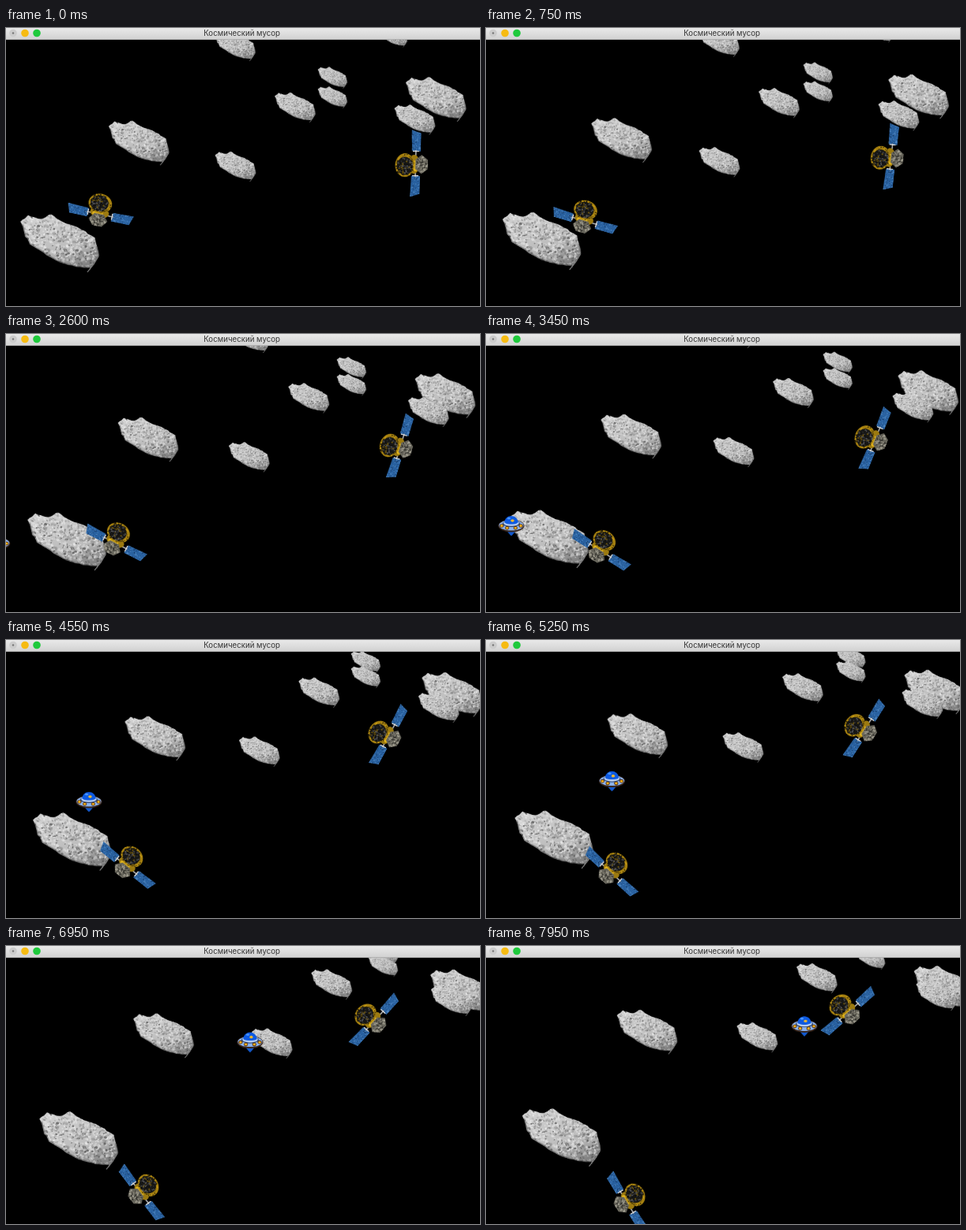
These frames come from a looping animation (600 px wide and 353 px high, 8000 ms). An HTML page with a canvas:

```html
<!DOCTYPE html>
<html lang="ru">
<head>
<meta charset="utf-8">
<title>Космический мусор</title>
<style>
  html, body { margin: 0; width: 100%; height: 100%; overflow: hidden; background: #000; }
  canvas { display: block; }
</style>
</head>
<body>
<canvas id="stage" width="600" height="353"></canvas>
<script>
const LOOP = 8000, STEP = 50, DETAIL = 3, TURN = Math.PI * 2;
const ctx = document.getElementById('stage').getContext('2d');
ctx.imageSmoothingQuality = 'high';

let seed = 11;
const rnd = () => (seed = (seed * 16807) % 2147483647) / 2147483647;
const between = (a, b) => a + (b - a) * rnd();

// Paints once at high detail, with the origin in the middle of the sprite.
function sprite(w, h, paint) {
  const image = document.createElement('canvas');
  image.width = w * DETAIL;
  image.height = h * DETAIL;
  const g = image.getContext('2d');
  g.scale(DETAIL, DETAIL);
  g.translate(w / 2, h / 2);
  paint(g);
  return { image, w, h };
}

function stamp({ image, w, h }, x, y, scale = 1, angle = 0) {
  ctx.save();
  ctx.translate(x, y);
  ctx.rotate(angle);
  ctx.scale(scale, scale);
  ctx.drawImage(image, -w / 2, -h / 2, w, h);
  ctx.restore();
}

function trace(g, pts) {
  g.beginPath();
  pts.forEach(([x, y]) => g.lineTo(x, y));
}

function poly(g, pts, fill) {
  trace(g, pts);
  g.closePath();
  g.fillStyle = fill;
  g.fill();
}

function line(g, pts, color, width) {
  trace(g, pts);
  g.strokeStyle = color;
  g.lineWidth = width;
  g.stroke();
}

function oval(g, x, y, rx, ry, fill, turn = 0) {
  g.beginPath();
  g.ellipse(x, y, rx, ry, turn, 0, TURN);
  g.fillStyle = fill;
  g.fill();
}

// Scatters specks over an ellipse, cycling through the colours.
function speckle(g, count, x, y, rx, ry, size, colors) {
  for (let i = 0; i < count; i++) {
    const a = rnd() * TURN, r = Math.sqrt(rnd());
    oval(g, x + rx * r * Math.cos(a), y + ry * r * Math.sin(a),
      size * between(.5, 1.2), size * between(.4, .9), colors[i % colors.length], a);
  }
}

// Breaks every edge into short rough pieces.
function roughen(pts, pieces, rough) {
  return pts.flatMap(([x, y], i) => {
    const [nx, ny] = pts[(i + 1) % pts.length];
    return Array.from({ length: pieces }, (_, k) => [
      x + (nx - x) * k / pieces + between(-rough, rough),
      y + (ny - y) * k / pieces + between(-rough, rough)
    ]);
  });
}

const rock = sprite(104, 80, g => {
  g.translate(-50, -37);
  const outline = roughen([
    [0, 9], [9, 1], [26, 6], [38, -1], [50, 8], [77, 19], [93, 29], [99, 52],
    [89, 67], [70, 67], [48, 60], [28, 48], [11, 38], [4, 24]
  ], 4, .7);
  const light = g.createLinearGradient(42, 0, 62, 72);
  light.addColorStop(0, '#cfcfcf');
  light.addColorStop(.6, '#bdbdbd');
  light.addColorStop(1, '#7c7c7c');
  g.save();
  poly(g, outline, light);
  g.clip();
  speckle(g, 420, 50, 34, 56, 42, 2.3, ['rgba(250,250,250,.3)', 'rgba(60,60,60,.22)']);
  speckle(g, 500, 50, 34, 56, 42, 1.1, ['rgba(255,255,255,.5)', 'rgba(40,40,40,.45)']);
  for (let i = 0; i < 26; i++) {
    const x = between(6, 94), y = between(5, 65), r = between(1, 2.6);
    oval(g, x + .9, y + .9, r, r * .8, 'rgba(250,250,250,.6)');
    oval(g, x, y, r * .8, r * .65, 'rgba(70,70,70,.7)');
  }
  line(g, outline.slice(26), 'rgba(40,40,40,.4)', 3);
  g.restore();
  for (const reach of [0, 3]) {
    line(g, [[98 - reach, 53], [92 - reach, 63], [84 + reach, 73 - reach]], '#828282', 1.2);
  }
});

const satellite = sprite(90, 60, g => {
  for (const side of [-1, 1]) {
    g.save();
    poly(g, [[16, -5], [42.5, -6], [38.5, 6], [15.5, 6]].map(([x, y]) => [side * x, y]), '#28609f');
    g.clip();
    speckle(g, 170, side * 29, 0, 18, 9, .8, ['#5189c4', '#173b68', '#3a74b2']);
    g.restore();
    line(g, [[0, 0], [side * 17, 0]], '#a8a8a8', 1.6);
    line(g, [[side * 15.5, -4], [side * 15.5, 4]], '#e4e4e4', 1.2);
  }

  oval(g, -1, -2, 12, 7, '#9c7a10');
  oval(g, -3, 0, 7, 4, '#e0b31c');
  const hexagon = Array.from({ length: 6 }, (_, i) =>
    [-1 + 12 * Math.cos(i * TURN / 6), 7.5 + 9 * Math.sin(i * TURN / 6)]);
  poly(g, hexagon, '#67655b');
  speckle(g, 90, -1, 8, 10, 7, 1.1, ['#33322d', '#a9a698', '#807d70']);

  oval(g, -2.5, -13.5, 15, 12.3, '#a5800f');
  speckle(g, 130, -2.5, -13.5, 14.5, 12, 1, ['#c99d17', '#4a390a', '#211a08']);
  oval(g, -3.5, -13.5, 11.5, 10, '#171715');
  speckle(g, 70, -3.5, -13.5, 11, 9.5, 1.2, ['#3d3e42', '#0b0b0b', '#57585c', '#6f570d']);
});

const saucer = sprite(40, 36, g => {
  poly(g, [[-7, 5], [7, 5], [2, 11], [0, 13], [-2, 11]], '#1258cc');
  oval(g, 0, 0, 16.5, 8, '#38251a');
  oval(g, 0, -.6, 15.6, 6.6, '#8db3ec');
  oval(g, 0, -2.8, 11, 4.2, '#2a3f66');
  oval(g, 0, -3.4, 9.8, 3.8, '#b5ccf2');
  g.beginPath();
  g.ellipse(0, -4.5, 8.5, 8, 0, Math.PI, TURN);
  g.ellipse(0, -4.5, 8.5, 2.5, 0, 0, Math.PI);
  g.fillStyle = '#0d5ae2';
  g.fill();
  oval(g, -3, -9.5, 2.2, 1.3, '#4997ff');
  oval(g, 1.5, -6.5, 2.2, 1.7, '#efb92b');
  for (let i = 0; i < 4; i++) {
    const a = Math.PI * (.08 + .28 * i), x = 12.5 * Math.cos(a), y = 4.2 * Math.sin(a) - 1;
    oval(g, x, y, 2.6, 2.3, '#4e2b10');
    oval(g, x, y, 1.7, 1.5, '#f8b41c');
  }
});

// Smaller rocks drift faster; climb is the slope of the drift. Back to front.
const SIZES = { huge: 100, big: 77, mid: 52, small: 37.5 };
const rocks = [
  { x: 19, y: 237, size: 'huge', climb: 1.1 },
  { x: 130.5, y: 118, size: 'big', climb: 1.03 },
  { x: 265, y: 157, size: 'mid', climb: 1.13 },
  { x: 340.5, y: 82, size: 'mid', climb: 1.13 },
  { x: 264.5, y: 4, size: 'mid', climb: 1.05 },
  { x: 471, y: -3, size: 'small', climb: .87 },
  { x: 395, y: 49.5, size: 'small', climb: .84 },
  { x: 395, y: 74.5, size: 'small', climb: .98 },
  { x: 506.5, y: 62.5, size: 'big', climb: 1.04 },
  { x: 492, y: 97.5, size: 'mid', climb: 1.01 }
];

// Both satellites spin alike and drift in opposite directions.
const satellites = [
  { x: 119, y: 236.5, tilt: 12, way: 1 },
  { x: 518.5, y: 172, tilt: -88.3, way: -1 }
];

function titleBar() {
  const g = ctx.createLinearGradient(0, 0, 0, 14);
  g.addColorStop(0, '#e9e9e9');
  g.addColorStop(1, '#d2d2d2');
  ctx.fillStyle = g;
  ctx.fillRect(0, 0, 600, 14);
  ctx.fillStyle = '#b0b0b0';
  ctx.fillRect(0, 14, 600, 1);
  ['#cbcbcb', '#f6bb12', '#1fc93c'].forEach((color, i) => oval(ctx, 9 + 15 * i, 6.5, 4.8, 4.8, color));
  oval(ctx, 9, 6.5, 1.2, 1.2, '#777');
  ctx.fillStyle = '#333';
  ctx.font = '9.7px Inter, Roboto, sans-serif';
  ctx.textAlign = 'center';
  ctx.fillText('Космический мусор', 298.6, 10.4);
}

function draw(t) {
  ctx.fillStyle = '#000';
  ctx.fillRect(0, 0, 600, 353);

  for (const { x, y, size, climb } of rocks) {
    const scale = SIZES[size] / 100, shift = 3.46 / scale * t;
    stamp(rock, x + 50 * scale + shift, y + 37 * scale - shift * climb, scale);
  }
  for (const { x, y, tilt, way } of satellites) {
    stamp(satellite, x + way * 7.45 * t, y + way * 11.15 * t, 1, (tilt + 5.87 * t) * TURN / 360);
  }
  // The saucer flies in from the left on a gently bending, quickening course.
  if (t > 2.5) {
    const s = t - 3.45;
    stamp(saucer,
      32 + s * (58.2 + s * (8.06 - .594 * s)),
      243.5 - s * (30.9 + s * (4.39 - .947 * s)));
  }
  titleBar();
}

function tick() {
  const ms = performance.now() % LOOP;
  draw(Math.floor(ms / STEP) * STEP / 1000);
  requestAnimationFrame(tick);
}
tick();
</script>
</body>
</html>
```
